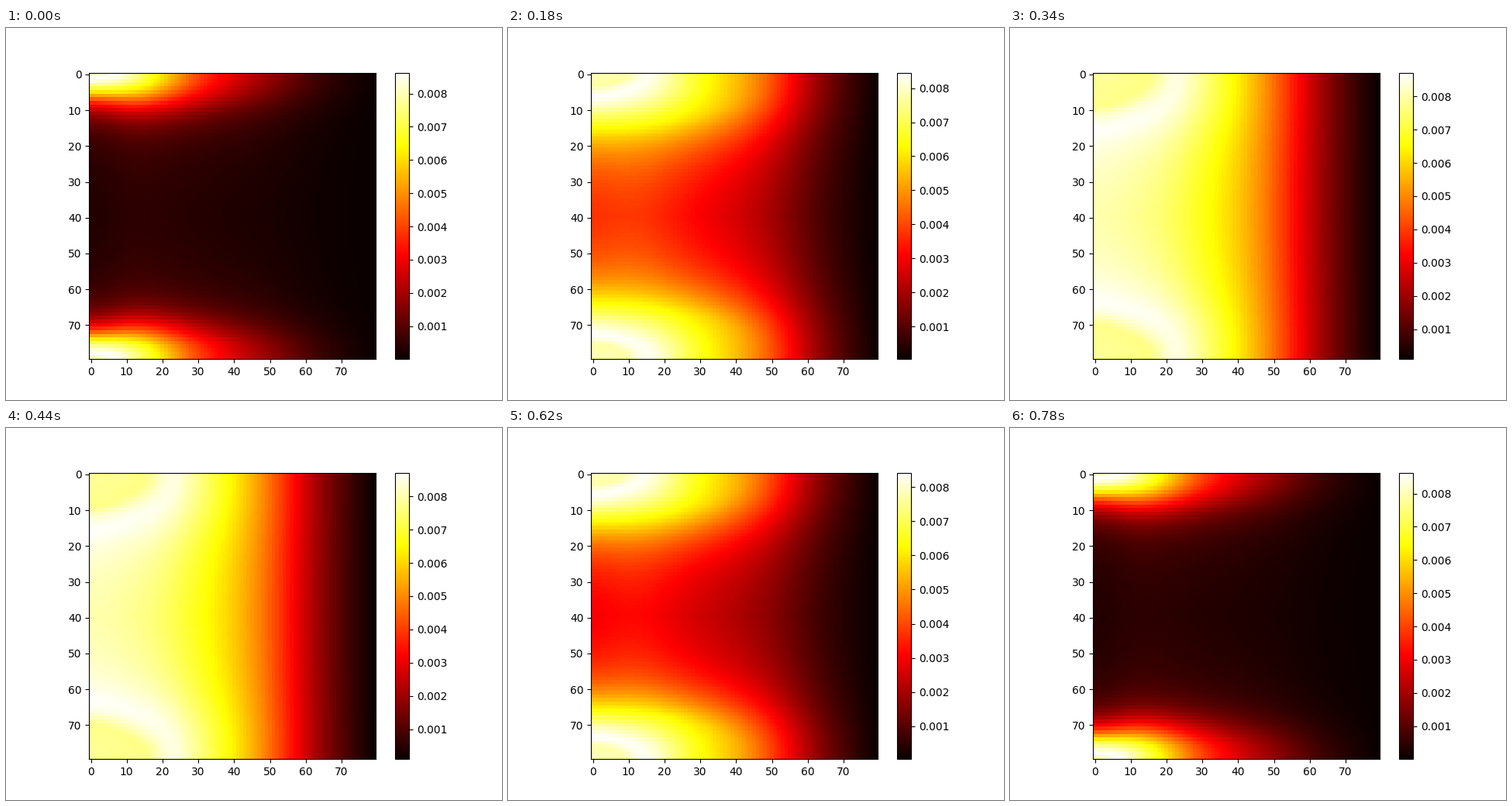
Animation, 640 px wide and 480 px high, one loop 800 ms. Source, as a matplotlib script:

```python
import numpy as np
import matplotlib.pyplot as plt
from matplotlib.animation import FuncAnimation

N = 80
STEPS = 20           # forward steps, then played backwards
PLATEAU = 0.0078     # value left behind the front
CAPACITY = 1.05      # growth limit relative to the top of the scale


def logistic(z):
    return 1 / (1 + np.exp(-z))


def bump(v, width):
    return np.exp(-(v / width) ** 2)


def smoothstep(s):
    s = np.clip(s, 0, 1)
    return s * s * (3 - 2 * s)


cell = np.arange(N)
x = cell[None, :].astype(float)
y = np.minimum(cell, N - 1 - cell)[:, None].astype(float)   # mirrored

# steady profile across x, pinned to zero at the right edge
steady = logistic((56 - x) / 9) - logistic((56 - N) / 9) * (x / N) ** 12

# time at which the front arrives: quick along x, slower towards the middle
radius = np.hypot(24 * x**2 / (x**2 + 38**2), y)
lag = 1.7 * np.tanh((x / 30) ** 2) * (1 - bump(y, 20))
arrival = 13 - 22 * np.exp(-radius / 9) + lag

# local speed of growth, and its slowdown once the front has passed
rate = 1 - .4 * (1 - bump(x, 9)) * (.3 + .7 * bump(y, 10))
slowdown = (.75 + .25 * bump(y, 12)) * (.12 + .88 / (1 + (x / 28) ** 4))


def top(t):
    return np.interp(t, [0, 4, 8, 14, 19],
                     [.00863, .00861, .00842, .00862, .00877])


def field(t):
    d = t - arrival
    passed = (d + np.sqrt(d * d + .4)) / 2
    tau = rate * (d - passed + slowdown * passed)
    settled = (CAPACITY - PLATEAU / top(t)) * smoothstep((tau - 5.5) / 6)
    u = CAPACITY * logistic(.33 * (tau + 2.75)) - settled
    return np.clip(u * steady, 0, 1) * top(t)


def draw(k):
    t = min(k, 2 * STEPS - 1 - k)
    u = field(t)
    img.set_data(u)
    img.set_clim(u.min(), top(t))
    return [img]


fig = plt.figure(figsize=(6.4, 4.8), dpi=100)
ax = fig.add_subplot()
img = ax.imshow(field(0), cmap="hot")
fig.colorbar(img, ax=ax)
draw(0)

anim = FuncAnimation(fig, draw, frames=2 * STEPS, interval=20, repeat=True)
plt.show()
```
